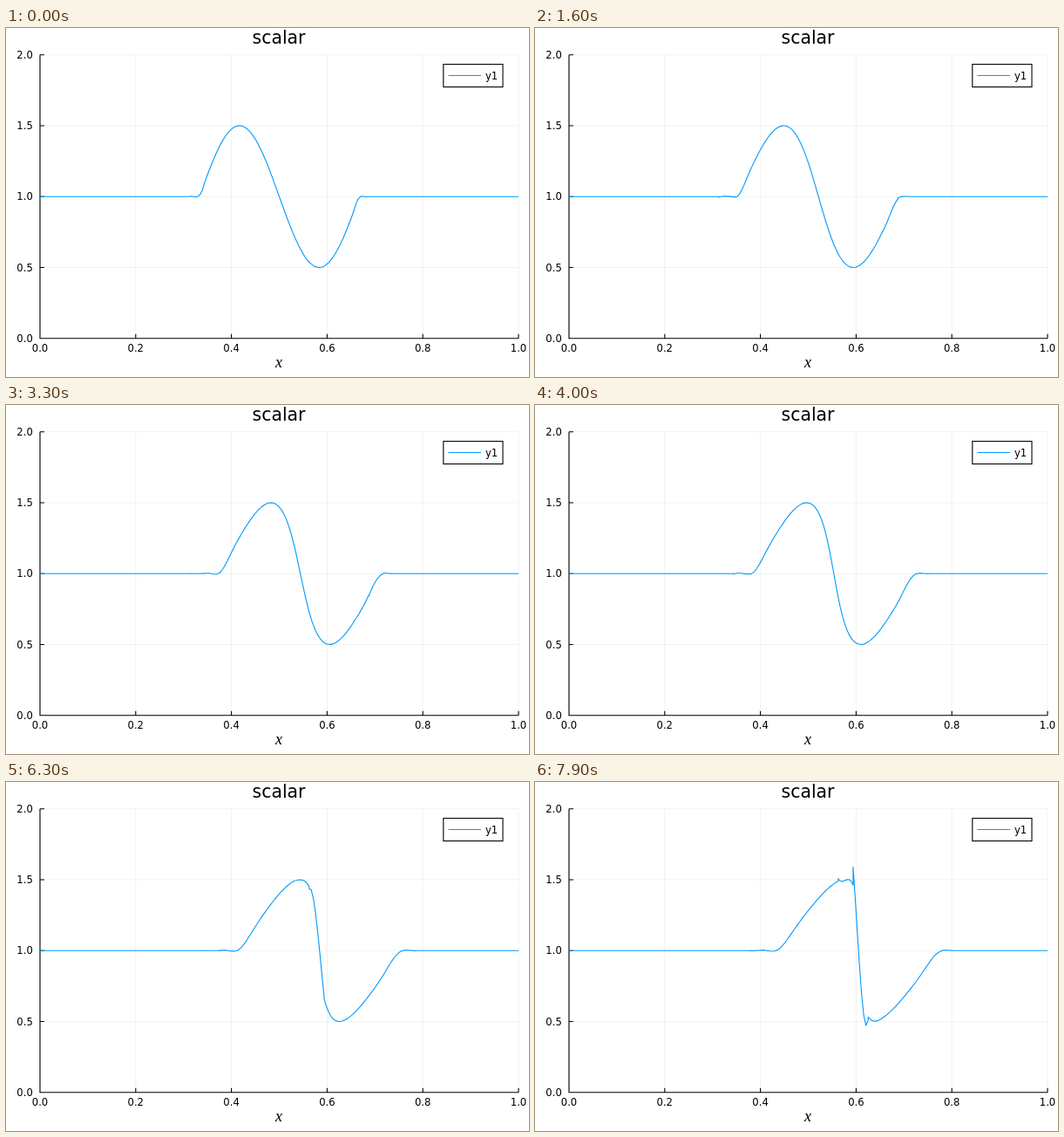
These frames come from a looping animation (600 by 400 pixels, 8000 ms). An HTML page:

```html
<!DOCTYPE html>
<html lang="en">
<head>
<meta charset="utf-8">
<title>scalar</title>
<style>
html, body { margin: 0; width: 100%; height: 100%; overflow: hidden; background: #fff; }
svg { display: block; width: 600px; height: 400px; font: 11.6px "DejaVu Sans", sans-serif; }
.grid { stroke: #000; stroke-opacity: .1; stroke-width: .55; }
.axis { fill: none; stroke: #000; stroke-width: 1.1; }
.wave { fill: none; stroke: #009afa; stroke-width: 1.1; stroke-linejoin: round; }
.mid { text-anchor: middle; }
.end { text-anchor: end; }
.title { font-size: 20.4px; }
.label { font: italic 18px "Liberation Serif", serif; }
</style>
</head>
<body>
<svg viewBox="0 0 600 400">
  <path id="grid" class="grid"/>
  <path id="axes" class="axis"/>
  <g id="ticks"></g>
  <text class="mid title" x="313" y="18">scalar</text>
  <text class="mid label" x="313" y="388.5">x</text>
  <path id="wave" class="wave"/>
  <rect class="axis" x="501.8" y="41.6" width="68.2" height="26" style="fill:#fff"/>
  <path class="wave" d="M507.5 54.5H545"/>
  <text x="550" y="58.8">y1</text>
</svg>
<script>
const $ = id => document.getElementById(id);
const px = x => 39 + 549 * x;
const py = u => 355.7 - 162.5 * u;

// Axes
let grid = "", axes = `M39 30.7V355.7H588`;
const addText = (x, y, cls, str) =>
  $("ticks").insertAdjacentHTML("beforeend", `<text x="${x}" y="${y}" class="${cls}">${str}</text>`);
for (let i = 0; i <= 5; i++) {
  const x = px(i / 5);
  grid += `M${x} 30.7V355.7`;
  axes += `M${x} 355.7v-5`;
  addText(x, 371, "mid", (i / 5).toFixed(1));
}
for (let i = 0; i <= 4; i++) {
  const y = py(i / 2);
  grid += `M39 ${y}H588`;
  axes += `M39 ${y}h5`;
  addText(30.8, y + 4.2, "end", (i / 2).toFixed(1));
}
$("grid").setAttribute("d", grid);
$("axes").setAttribute("d", axes);

// Inviscid Burgers equation, discontinuous Galerkin on Lobatto nodes
const CELLS = 32, FRAMES = 80, STEP = 1 / 750, SUB = 2;
const nodes = [-1, -Math.sqrt(.2), Math.sqrt(.2), 1];
const weights = [1 / 6, 5 / 6, 5 / 6, 1 / 6];
const N = nodes.length;

const lagrange = (j, s) => nodes.reduce((p, n, k) => k === j ? p : p * (s - n) / (nodes[j] - n), 1);
const slope = (j, s) => nodes.reduce((sum, n, m) => m === j ? sum : sum +
  nodes.reduce((p, q, k) => k === j || k === m ? p : p * (s - q) / (nodes[j] - q), 1) / (nodes[j] - n), 0);
const D = nodes.map(s => nodes.map((_, j) => slope(j, s)));
const views = Array.from({ length: 2 * N }, (_, i) => -1 + 2 * i / (2 * N - 1));
const basis = views.map(s => nodes.map((_, j) => lagrange(j, s)));

const flux = u => u * u / 2;
const edgeFlux = (a, b) => (flux(a) + flux(b)) / 2 - Math.max(Math.abs(a), Math.abs(b)) * (b - a) / 2;
const start = x => x > 1 / 3 && x < 2 / 3 ? 1 + .5 * Math.sin(6 * Math.PI * (x - 1 / 3)) : 1;

function rate(u) {
  const out = new Float64Array(u.length);
  const at = i => u[(i + u.length) % u.length];
  for (let c = 0; c < CELLS; c++) {
    const o = c * N;
    for (let i = 0; i < N; i++) {
      let sum = 0;
      for (let j = 0; j < N; j++) sum += weights[j] * D[j][i] * flux(u[o + j]);
      if (i === 0) sum += edgeFlux(at(o - 1), u[o]);
      if (i === N - 1) sum -= edgeFlux(u[o + i], at(o + N));
      out[o + i] = sum * 2 * CELLS / weights[i];
    }
  }
  return out;
}

function advance(u, dt) {
  const add = (k, h) => u.map((v, i) => v + h * k[i]);
  const a = rate(u), b = rate(add(a, dt / 2)), c = rate(add(b, dt / 2)), d = rate(add(c, dt));
  return u.map((v, i) => v + dt / 6 * (a[i] + 2 * b[i] + 2 * c[i] + d[i]));
}

function trace(u) {
  const pts = [];
  for (let c = 0; c < CELLS; c++)
    views.forEach((s, k) => {
      const v = basis[k].reduce((sum, w, j) => sum + w * u[c * N + j], 0);
      pts.push(px((c + (s + 1) / 2) / CELLS).toFixed(2) + " " + py(v).toFixed(2));
    });
  return "M" + pts.join("L");
}

let u = Float64Array.from({ length: CELLS * N }, (_, i) =>
  start((Math.floor(i / N) + (nodes[i % N] + 1) / 2) / CELLS));
const paths = [];
for (let f = 0; f < FRAMES; f++) {
  paths.push(trace(u));
  for (let s = 0; s < SUB; s++) u = advance(u, STEP / SUB);
}

let shown = -1;
function draw() {
  const f = Math.floor(performance.now() / 100) % FRAMES;
  if (f !== shown) $("wave").setAttribute("d", paths[shown = f]);
  requestAnimationFrame(draw);
}
draw();
</script>
</body>
</html>
```
